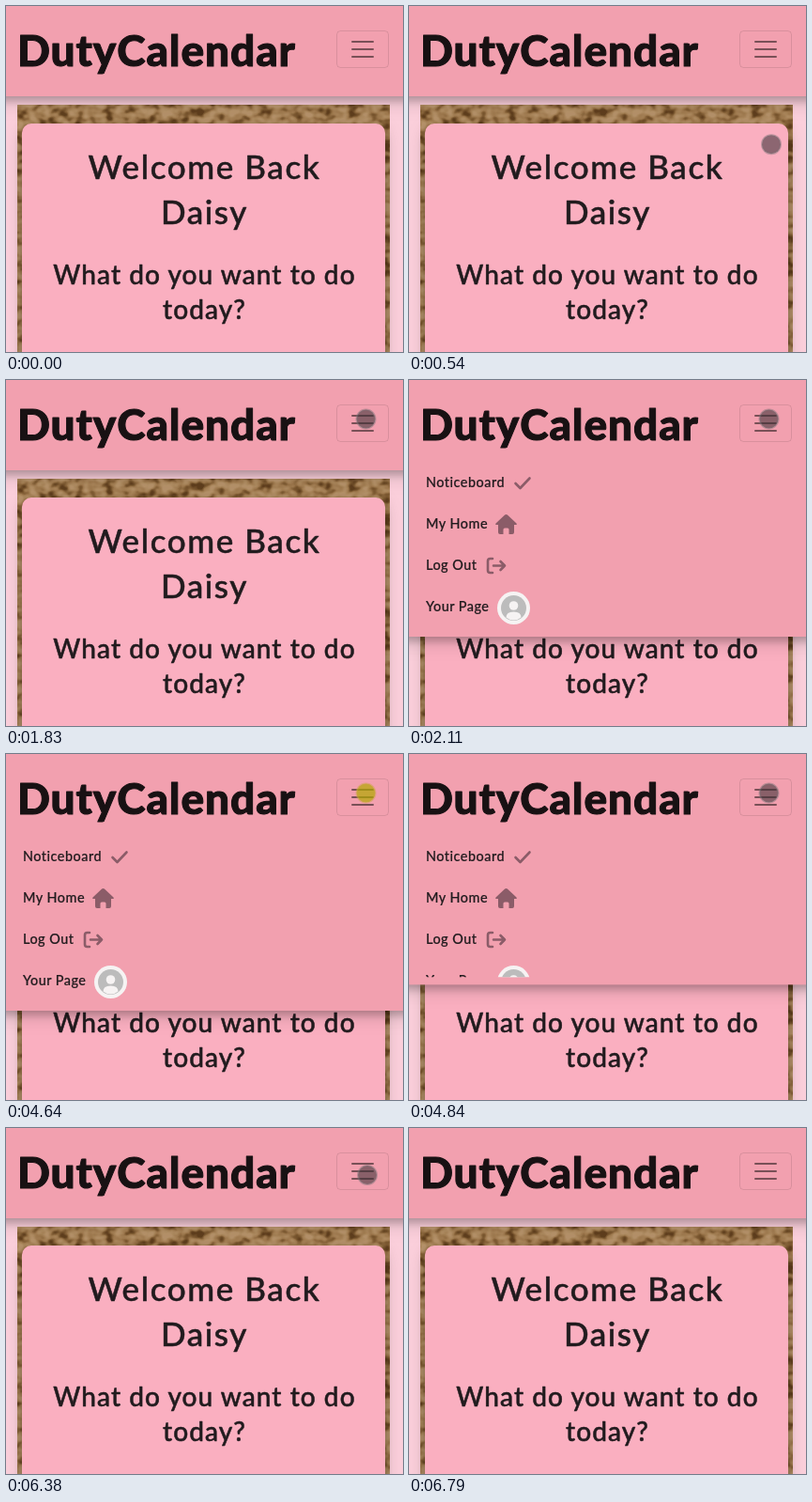
Write an HTML page that moves like this. It is 423 px wide and 368 px high and loops after 7120 ms.

```html
<!DOCTYPE html>
<html lang="en">
<head>
<meta charset="utf-8">
<title>Menu demo</title>
<style>
  html, body { margin: 0; width: 100%; height: 100%; overflow: hidden; background: #fbcfdb; }
  svg { display: block; }
  text { font-family: Lato, "Open Sans", sans-serif; font-weight: 500; fill: #211b1e; }
  .brand { font-size: 46px; font-weight: 800; letter-spacing: .9px; fill: #181113; stroke: #181113; stroke-linejoin: round; }
  .heading { text-anchor: middle; stroke: #211b1e; stroke-width: .5; stroke-linejoin: round; }
  .large { font-size: 35px; letter-spacing: 1.6px; }
  .small { font-size: 28px; letter-spacing: 1.05px; }
  .menu { font-size: 14.4px; letter-spacing: .5px; stroke: #211b1e; stroke-width: .2; }
  .raised { filter: drop-shadow(0 4px 4px rgba(0,0,0,.2)) drop-shadow(0 5px 9px rgba(0,0,0,.18)); }
  .line { fill: none; stroke: #8b5c68; stroke-width: 2.6; stroke-linecap: round; stroke-linejoin: round; }
  .solid { stroke: none; }
</style>
</head>
<body>
<svg width="423" height="368" viewBox="0 0 423 368">
  <defs>
    <filter id="cork" x="0" y="0" width="1" height="1" color-interpolation-filters="sRGB">
      <feTurbulence type="fractalNoise" baseFrequency=".085 .11" numOctaves="2" seed="8"/>
      <feColorMatrix values="2.2 0 0 0 -.55  2.2 0 0 0 -.55  2.2 0 0 0 -.55  0 0 0 0 1"/>
      <feComponentTransfer>
        <feFuncR type="table" tableValues=".38 .5 .63 .68 .72"/>
        <feFuncG type="table" tableValues=".25 .36 .48 .54 .58"/>
        <feFuncB type="table" tableValues=".12 .2 .31 .37 .42"/>
      </feComponentTransfer>
    </filter>
    <clipPath id="menuClip"><rect id="menuArea" y="88" width="423" height="0"/></clipPath>
  </defs>

  <rect width="423" height="368" fill="#fbcfdb"/>
  <rect x="12" y="105" width="397" height="300" filter="url(#cork)"/>
  <rect class="raised" x="17" y="125" width="387" height="300" rx="10" fill="#faafc0"/>
  <g class="heading">
    <text class="large" x="211.500" y="184">Welcome Back</text>
    <text class="large" x="211.500" y="232">Daisy</text>
    <text class="small" x="211.500" y="296">What do you want to do</text>
    <text class="small" x="211.500" y="333">today?</text>
  </g>

  <rect id="nav" class="raised" x="-30" y="-30" width="483" height="126" fill="#f2a0af"/>
  <text class="brand" x="12" y="64">DutyCalendar</text>
  <g fill="none">
    <rect x="352.500" y="26.500" width="55" height="39" rx="4" stroke="#000" stroke-opacity=".1"/>
    <path d="M369 38h22M369 46h22M369 54h22" stroke="#000" stroke-opacity=".5" stroke-width="2" stroke-linecap="round"/>
  </g>

  <g class="menu" clip-path="url(#menuClip)">
    <text x="18" y="114">Noticeboard</text>
    <path class="line" d="M113.500 110l5 5 10-10.500"/>
    <text x="18" y="158">My Home</text>
    <path class="solid" fill="#8b5c68" d="M103.500 143q1 0 2 1l9 8.500q1 1.500-1 1.500h-1.500v8q0 2-2 2h-3.500v-5q0-1.500-1.500-1.500h-3q-1.500 0-1.500 1.500v5h-3.500q-2 0-2-2v-8h-1.500q-2 0-1-1.500l9-8.500q1-1 2-1z"/>
    <text x="18" y="202">Log Out</text>
    <path class="line" d="M89 190h-2.500q-2.500 0-2.500 2.500v10q0 2.500 2.500 2.500h2.500M90 197.500h12M97.500 193l4.500 4.500-4.500 4.500"/>
    <text x="18" y="246">Your Page</text>
    <g class="solid" fill="#f6f3f3">
      <circle cx="111.500" cy="242.500" r="17.500"/>
      <circle cx="111.500" cy="242.500" r="13.500" fill="#bcbcbc"/>
      <circle cx="111.500" cy="240" r="4.800"/>
      <path d="M103.500 252.500q0-6 8-6t8 6q-3.500 3-8 3t-8-3z"/>
    </g>
  </g>

  <circle id="dot" r="10" stroke-width="2"/>
</svg>
<script>
const LOOP = 7120;
const [nav, menuArea, dot] = ["nav", "menuArea", "dot"].map(id => document.getElementById(id));
const within = (t, a, b) => t >= a && t < b;

// Progress from 0 to 1 in n equal jumps
const step = (t, a, b, n) =>
  Math.min(1, Math.max(0, Math.floor((t - a) / (b - a) * n + 1e-6) / n));
const ease = p => p * p * (3 - 2 * p);

function dotPlace(t) {
  if (t < 330 || within(t, 6520, 6720) || t >= 6790) return null;
  if (t < 1230) {
    const s = step(t, 330, 1030, 10), left = (1 - s) ** 2.8;
    return [382 + 16 * left - 30 * s * s * (1 - s), 33.5 + 308.5 * left];
  }
  if (t < 6380) {
    const s = step(t, 1150, 1630, 6);
    return [382 + 1.5 * s, 33.5 + 8 * s];
  }
  return t < 6450 ? [385, 50] : t < 6520 ? [396.5, 128.5] : [398.5, 363];
}

function draw(t) {
  const open = ease(step(t, 1770, 2110, 5)) - ease(step(t, 4770, 5040, 4));
  menuArea.setAttribute("height", 177 * open);
  nav.setAttribute("height", 126 + 177 * open);

  const place = dotPlace(t);
  dot.style.display = place ? "" : "none";
  if (!place) return;
  const pressed = within(t, 1630, 1770) || within(t, 4640, 4770);
  dot.setAttribute("transform", `translate(${place})`);
  dot.setAttribute("fill", pressed ? "rgba(178,168,0,.7)" : "rgba(60,50,55,.58)");
  dot.setAttribute("stroke", pressed ? "rgba(205,165,70,.45)" : "rgba(125,115,120,.45)");
}

function tick() {
  draw(performance.now() % LOOP);
  requestAnimationFrame(tick);
}
tick();
</script>
</body>
</html>
```
